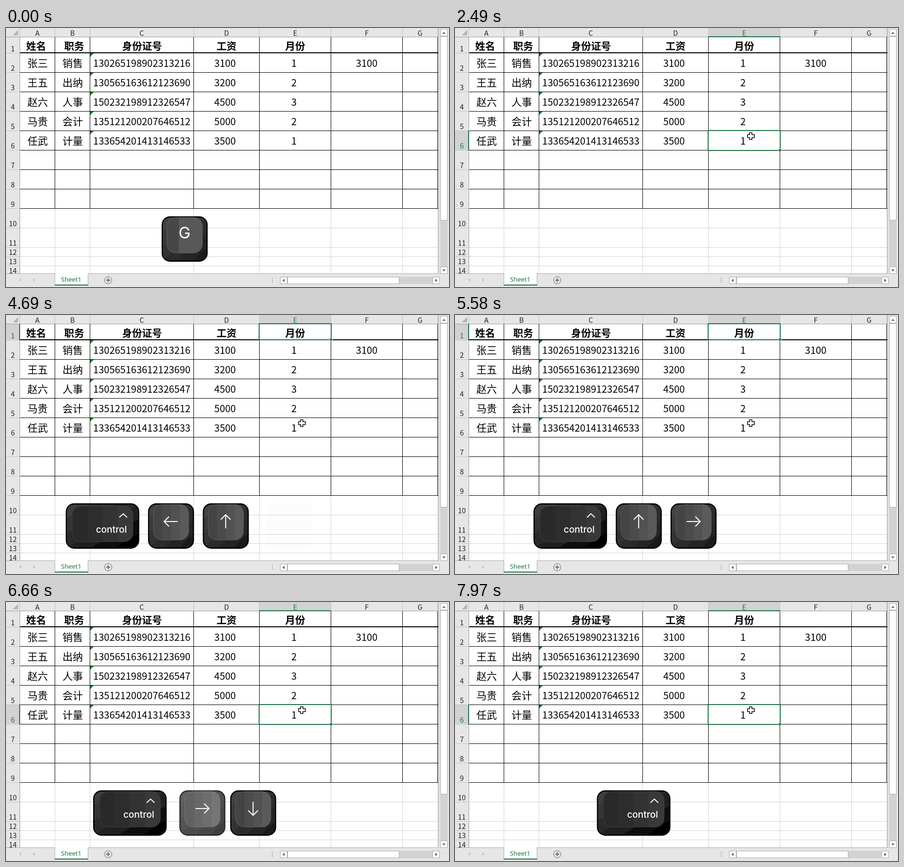
These frames come from a looping animation (910x533 px, 8 s). An HTML page:

```html
<!DOCTYPE html>
<html lang="zh">
<head>
<meta charset="utf-8">
<style>
  html, body { margin: 0; width: 100%; height: 100%; overflow: hidden; background: #fff; }
  svg { display: block; width: 910px; height: 533px; }
  text { font-family: "Noto Sans CJK SC", "Noto Sans CJK", sans-serif; text-anchor: middle; fill: #000; }
  .crisp { shape-rendering: crispEdges; }
  .cell { font-size: 20px; font-weight: 300; }
  .han { font-size: 21px; font-weight: 300; }
  .title { font-size: 20.5px; font-weight: 700; }
  .head { font-size: 14.5px; font-weight: 300; fill: #222; }
  .head.on { fill: #217346; }
  .cap, .letter { font-family: Inter, sans-serif; fill: #fff; }
  .cap { font-size: 19px; font-weight: 500; text-anchor: end; }
  .letter { font-size: 33px; }
  .sign { fill: none; stroke: #fff; stroke-width: 2; }
</style>
</head>
<body>
<svg id="stage" viewBox="0 0 910 533"></svg>
<script>
const LOOP = 8000, GREEN = '#217346';
const COLS = [28, 100, 172, 385, 520, 667, 814, 886];
const ROWS = [18, 51, 91, 131, 171, 211, 251, 291, 331, 371, 411, 451, 470, 489, 508];
const stage = document.getElementById('stage');

function el(name, attrs, parent = stage, content) {
  const node = document.createElementNS('http://www.w3.org/2000/svg', name);
  set(node, attrs);
  if (content !== undefined) node.textContent = content;
  return parent.appendChild(node);
}
function set(node, attrs) {
  for (const k in attrs) node.setAttribute(k, attrs[k]);
}
const box = (x, y, width, height, fill, more = {}, parent) =>
  el('rect', { x, y, width, height, fill, class: 'crisp', ...more }, parent);
const label = (x, y, text, cls, parent) => el('text', { x, y, class: cls }, parent, text);
const shape = (d, attrs, parent) => el('path', { d, ...attrs }, parent);
const clamp = v => Math.max(0, Math.min(1, v));

// Sheet grid
box(0, 0, 910, 533, '#fff');
for (const y of ROWS.slice(10, 14)) box(29, y, 859, 1, '#d4d4d4');
for (const x of COLS.slice(1)) {
  box(x, 372, 1, 134, '#d4d4d4');
  box(x, 19, 1, 353, '#000');
}
for (const y of ROWS.slice(2, 10)) box(29, y, 859, 1, '#000');
box(29, 50, 859, 2, '#000');

// Headers
box(0, 0, 889, 18, '#e6e6e6');
box(0, 0, 28, 506, '#e6e6e6');
for (const x of COLS) box(x, 0, 1, 18, '#c3c3c3');
for (const y of ROWS.slice(1)) box(0, y, 28, 1, '#c3c3c3');
box(0, 18, 889, 1, '#9b9b9b');
box(28, 18, 1, 488, '#9b9b9b');
shape('M25 4V15H14Z', { fill: '#b4b4b4' });

function mark(x, y, w, h, bar) {
  const g = el('g', { visibility: 'hidden' });
  box(x, y, w, h, '#d2d2d2', {}, g);
  box(...bar, GREEN, {}, g);
  return g;
}
const colMarks = COLS.slice(0, 7).map((x, i) => {
  const w = COLS[i + 1] - x;
  return mark(x + 1, 0, w - 1, 17, [x, 17, w + 1, 2]);
});
const rowMarks = ROWS.slice(0, 14).map((y, i) => {
  const h = ROWS[i + 1] - y;
  return mark(0, y + 1, 27, h - 1, [27, y, 2, h + 1]);
});
const colHeads = [...'ABCDEFG'].map((c, i) =>
  label((COLS[i] + COLS[i + 1]) / 2 + 0.5, 16, c, 'head'));
const rowHeads = rowMarks.map((_, i) => label(14, ROWS[i + 1] - 3, i + 1, 'head'));

// Table contents
const titles = ['姓名', '职务', '身份证号', '工资', '月份'];
[62, 140, 279.5, 453, 594].forEach((x, i) => label(x, 44.5, titles[i], 'title'));
const people = [
  ['张三', '销售', '130265198902313216', '3100', '1', '3100'],
  ['王五', '出纳', '130565163612123690', '3200', '2'],
  ['赵六', '人事', '150232198912326547', '4500', '3'],
  ['马贵', '会计', '135121200207646512', '5000', '2'],
  ['任武', '计量', '133654201413146533', '3500', '1']
];
const centers = [65, 137, 279, 450, 591.5, 741];
people.forEach((row, r) => {
  const y = 80 + r * 40;
  row.forEach((v, c) => label(centers[c], y, v, c < 2 ? 'han' : 'cell'));
  shape(`M173 ${y - 28}h7l-7 7z`, { fill: '#0b7a1c' });
});

// Selection
const sel = el('g', { visibility: 'hidden' });
const selBox = el('rect', { fill: 'none', stroke: GREEN, 'stroke-width': 2, class: 'crisp' }, sel);
const selDot = box(0, 0, 6, 6, GREEN, { stroke: '#fff' }, sel);

// Scroll bars and tabs
box(889, 0, 21, 533, '#e6e6e6');
box(888, 0, 1, 506, '#9b9b9b');
box(892, 16, 15, 476, '#d2d2d2');
const button = (x, y, w, h) => box(x + 0.5, y + 0.5, w, h, '#fff', { stroke: '#ababab' });
button(892, 2, 14, 14);
button(892, 17, 14, 378);
button(892, 491, 14, 14);
shape('M896 12h7l-3.5-4zM896 497h7l-3.5 4z', { fill: '#666' });
box(0, 505, 910, 28, '#e6e6e6');
box(0, 505, 889, 1, '#ababab');
button(892, 491, 14, 14);
shape('M896 497h7l-3.5 4z', { fill: '#666' });
box(100, 505, 69, 24, '#fff');
box(100, 505, 1, 24, '#ababab');
box(168, 505, 1, 24, '#ababab');
box(100, 528, 69, 2, GREEN);
set(label(134, 522, 'Sheet1', ''), { style: `font:500 13px "Noto Sans",sans-serif;fill:${GREEN}` });
shape('M31 515v7l-4-3.5zM56 515v7l4-3.5z', { fill: '#c0c0c0' });
el('circle', { cx: 210, cy: 519, r: 7.5, fill: 'none', stroke: '#6a6a6a' });
shape('M206 519h8M210 515v8', { stroke: '#6a6a6a', 'stroke-width': 2 });
for (const y of [514, 518, 522]) box(546, y, 2, 2, '#a6a6a6');
box(578, 512, 298, 15, '#d2d2d2');
button(563, 512, 14, 14);
button(578, 512, 229, 14);
button(876, 512, 14, 14);
shape('M572 516v7l-4-3.5zM882 516v7l4-3.5z', { fill: '#555' });

// Key caps
const defs = el('defs', {});
function bands(id, colors, diagonal) {
  const g = el('linearGradient', { id, x2: 1, y2: diagonal ? 1 : 0 }, defs);
  colors.forEach((c, i) => [i, i + 1].forEach(n =>
    el('stop', { offset: n / colors.length, 'stop-color': c }, g)));
}
bands('base', ['#424242', '#3a3a3a', '#333', '#2b2b2b', '#242424', '#1a1a1a'], true);
bands('darkBase', ['#3d3d3d', '#343434', '#2a2a2a', '#202020', '#0d0d0d', '#000'], true);
bands('face', ['#444', '#4b4b4b', '#525252', '#5a5a5a']);
bands('duoFace', ['#474747', '#474747', '#474747', '#585858', '#585858', '#585858', '#585858', '#585858', '#585858']);
bands('darkFace', ['#292929', '#2d2d2d', '#333', '#393939']);

const ARROW = 'M-14 0H14M4-10L14 0L4 10';
const keys = [
  { name: 'G', from: -1000, out: 280 },
  { name: 'control', from: 2360, up: 6040 },
  { turn: 180, from: 2650, out: 4790 },
  { turn: -90, from: 3660, out: 5820 },
  { turn: 0, from: 4550, out: 6660 },
  { turn: 90, from: 5580, out: 7640 }
];
for (const k of keys) {
  const wide = k.name === 'control';
  k.w = wide ? 151 : 94.5;
  k.g = el('g', {});
  const inset = wide ? 13 : 11;
  el('rect', { x: 1.2, y: 388.7, width: k.w - 2.4, height: 91, rx: 16,
    fill: `url(#${wide ? 'darkBase' : 'base'})`, stroke: '#000', 'stroke-width': 2.4 }, k.g);
  k.top = el('g', {}, k.g);
  el('rect', { x: inset, y: 390, width: k.w - 2 * inset, height: 73, rx: 18,
    fill: `url(#${wide ? 'darkFace' : k.name ? 'duoFace' : 'face'})`,
    stroke: wide ? '#454545' : '#666', 'stroke-width': 0.9 }, k.top);
  if (wide) {
    label(125.5, 444, k.name, 'cap', k.top);
    shape('M110 413L118 405.500L126 413', { class: 'sign', 'stroke-width': 1.6 }, k.top);
  } else if (k.name) {
    label(47, 433, k.name, 'letter', k.top);
  } else {
    shape(ARROW, { class: 'sign', transform: `translate(47 425) rotate(${k.turn})` }, k.top);
  }
}

// Pointer
const pointer = shape('M-3-7h5v4h5v6h-5v4h-5v-4h-4v-6h4z',
  { fill: '#fff', stroke: '#000', 'stroke-width': 1.5 });

// Selected cell: start time, column, row
const moves = [[1010, 4, 5], [2670, 0, 5], [3700, 0, 0], [4600, 4, 0], [5630, 4, 5]];
const bounds = ([, c, r]) => [COLS[c], ROWS[r], COLS[c + 1] + 1, ROWS[r + 1] + (r ? 1 : 0)];

function drawSelection(t) {
  const i = moves.filter(m => t >= m[0]).length - 1;
  set(sel, { visibility: i < 0 ? 'hidden' : 'visible' });
  const [start, col, row] = moves[i] || [0, -1, -1];
  const show = (marks, heads, n) => marks.forEach((m, j) => {
    set(m, { visibility: j === n ? 'visible' : 'hidden' });
    heads[j].classList.toggle('on', j === n);
  });
  show(colMarks, colHeads, col);
  show(rowMarks, rowHeads, row);
  if (i < 0) return;
  const a = bounds(moves[Math.max(0, i - 1)]), b = bounds(moves[i]);
  const p = 1 - (1 - clamp((t - start) / 85)) ** 2;
  const [x, y, x2, y2] = a.map((v, j) => Math.round(v + (b[j] - v) * p));
  set(selBox, { x, y, width: x2 - x, height: y2 - y });
  set(selDot, { x: x2 - 3.5, y: y2 - 3.5 });
}

const slide = (t, s) => t < s ? 0 : clamp(0.31 + 0.69 * (t - s) / 130);

function drawKeys(t) {
  let total = -18;
  for (const k of keys) {
    const out = k.out || Infinity;
    k.room = slide(t, k.from) * (1 - slide(t, out + 190)) * (k.w + 18);
    k.enter = clamp((t - k.from - 140) / 160);
    k.leave = t < out ? 0 : clamp(0.16 + (t - out) / 190);
    total += k.room;
  }
  let x = 367 - total / 2;
  for (const k of keys) {
    const shift = 18 * (1 - k.enter) ** 2 + 20 * (1 - (1 - k.leave) ** 2.9);
    const alpha = k.enter * (1 - k.leave);
    set(k.g, { transform: `translate(${x + shift} 0)`, opacity: alpha,
      visibility: alpha ? 'visible' : 'hidden' });
    const pressed = 1 - clamp((t - (k.up || k.from + 310)) / 90);
    set(k.top, { transform: `translate(0 ${3.5 * pressed})` });
    x += k.room;
  }
}

function drawPointer(t) {
  const p = clamp((t - 320) / 640), e = p * p * (3 - 2 * p);
  set(pointer, { visibility: t < 320 ? 'hidden' : 'visible',
    transform: `translate(${754 - 146 * e} ${290 - 67.500 * e})` });
}

function frame(now) {
  const t = now % LOOP;
  drawSelection(t);
  drawKeys(t);
  drawPointer(t);
  requestAnimationFrame(frame);
}
const begin = performance.now();
const tick = () => {
  const t = (performance.now() - begin) % LOOP;
  drawSelection(t);
  drawKeys(t);
  drawPointer(t);
  requestAnimationFrame(tick);
};
tick();
</script>
</body>
</html>
```
